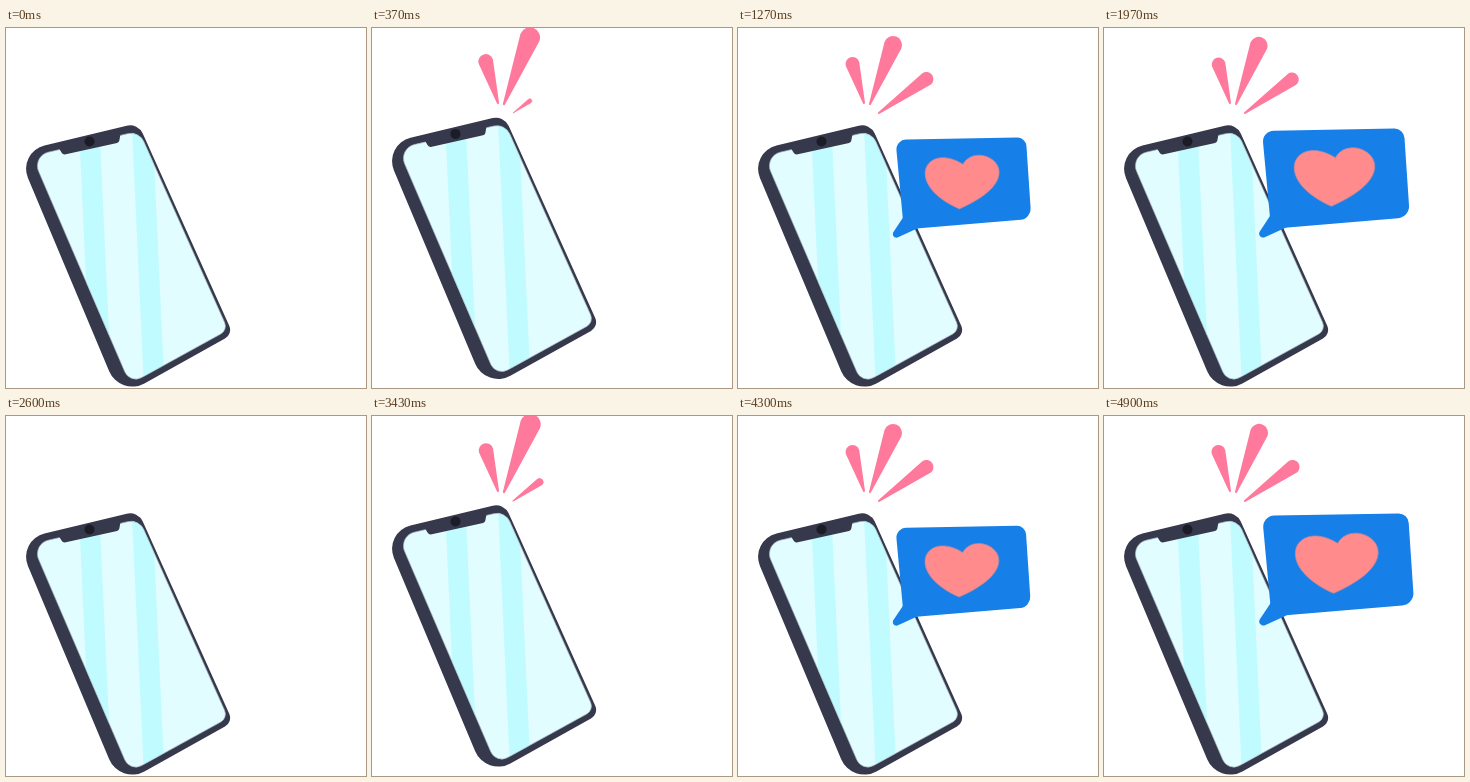
Animation, 360 px wide and 360 px high, one loop 5 s. Source, as an HTML page with a canvas:

```html
<!DOCTYPE html>
<html lang="en">
<head>
<meta charset="utf-8">
<title>Phone message</title>
<style>
  html, body { margin: 0; width: 100%; height: 100%; overflow: hidden; background: #fff; }
  canvas { display: block; width: 100vw; height: 100vh; }
</style>
</head>
<body>
<canvas id="stage"></canvas>
<script>
const SIZE = 360, LOOP = 5000, STEP = 200 / 3;
const REST = 2800, SECOND_POP = 3050;
const canvas = document.getElementById('stage');
const ctx = canvas.getContext('2d');

const COLORS = {
  body: '#36384b', screen: '#e1fdff', shine: '#c0fbff', rim: '#aab8c4',
  camera: '#1b1c26', bubble: '#177fe8', heart: '#ff8b8c', heartRim: '#b58a9c', spark: '#ff799c'
};

// Each corner is [x, y, radius].
function roundedShape(...corners) {
  const path = new Path2D();
  const [lastX, lastY] = corners[corners.length - 1];
  path.moveTo((lastX + corners[0][0]) / 2, (lastY + corners[0][1]) / 2);
  corners.forEach(([x, y, radius], i) => {
    const [nextX, nextY] = corners[(i + 1) % corners.length];
    path.arcTo(x, y, nextX, nextY, radius);
  });
  path.closePath();
  return path;
}

// A drop growing from its tip towards the centre of its round end.
function drop(tipX, tipY, endX, endY, radius) {
  const angle = Math.atan2(endY - tipY, endX - tipX);
  const path = new Path2D();
  path.moveTo(tipX, tipY);
  path.arc(endX, endY, radius, angle - Math.PI / 2, angle + Math.PI / 2);
  path.closePath();
  return { x: tipX, y: tipY, path };
}

const body = roundedShape([11, 124, 24], [132, 95, 14], [227, 306, 10], [114, 369, 25]);
const screen = roundedShape([26, 128, 14], [133, 103, 14], [222, 302, 9], [124, 356, 12]);
const notch = roundedShape([51, 117, 1], [57, 127, 4], [113, 114.5, 3], [115, 103, 1]);
const shines = [73, 126].map(x =>
  roundedShape([x, 100, 0], [x + 20.5, 100, 0], [x + 32.5, 360, 0], [x + 12, 360, 0]));
const bubble = roundedShape(
  [158, 102, 11], [301, 99.5, 10], [307, 189, 12], [182, 199.5, 12], [148, 215, 4], [166, 188, 3]);
const heart = new Path2D(
  'M228 178 C165 150 192 104 232 129 C248 100 315 140 228 178 Z');
const sparks = [
  drop(126, 75, 114.5, 36, 6),
  drop(132, 76, 155, 17, 8),
  drop(141, 85, 188.5, 51, 6)
];

const rise = (t, tau) => t > 0 ? 1 - Math.exp(-t / tau) : 0;
const spring = t => t > 0 ? 1 - Math.exp(-t / 90) * Math.cos(Math.PI * t / 190) : 0;
const bump = (t, center, width) => Math.exp(-(((t - center) / width) ** 2));

const hop = t => -8 * bump(t, 385, 80);
const sparkScale = (t, i) => spring(t - 138 - 100 * i) * spring(2357 - t);
const bubbleTurn = t => .035 * bump(t, 720, 150);

function bubbleScale(t) {
  const u = t - 870;
  const wobble = .22 * Math.exp(-u / 480) * Math.cos(Math.PI * u / 440);
  return rise(t - 385, 80) * rise(2230 - t, 55) * (1 + wobble);
}

function fill(path, color) {
  ctx.fillStyle = color;
  ctx.fill(path);
}

function outline(path, color, width) {
  ctx.strokeStyle = color;
  ctx.lineWidth = width;
  ctx.stroke(path);
}

function scaledAbout(x, y, scale, angle, draw) {
  if (scale < .01) return;
  ctx.save();
  ctx.translate(x, y);
  ctx.rotate(angle);
  ctx.scale(scale, scale);
  ctx.translate(-x, -y);
  draw();
  ctx.restore();
}

function drawPhone(lift) {
  ctx.save();
  ctx.translate(0, lift);
  fill(body, COLORS.body);
  fill(screen, COLORS.screen);
  ctx.save();
  ctx.clip(screen);
  shines.forEach(shine => fill(shine, COLORS.shine));
  ctx.restore();
  outline(screen, COLORS.rim, .7);
  fill(notch, COLORS.body);
  ctx.fillStyle = COLORS.camera;
  ctx.beginPath();
  ctx.arc(83.5, 113.5, 5, 0, 2 * Math.PI);
  ctx.fill();
  ctx.restore();
}

function drawScene(t) {
  ctx.fillStyle = '#fff';
  ctx.fillRect(0, 0, SIZE, SIZE);
  ctx.lineJoin = 'round';
  drawPhone(hop(t));
  sparks.forEach(({ x, y, path }, i) => {
    scaledAbout(x, y, sparkScale(t, i), 0, () => {
      fill(path, COLORS.spark);
      outline(path, COLORS.spark, 2);
    });
  });
  scaledAbout(152, 211, bubbleScale(t), bubbleTurn(t), () => {
    fill(bubble, COLORS.bubble);
    fill(heart, COLORS.heart);
    outline(heart, COLORS.heartRim, .8);
  });
}

function resize() {
  const ratio = devicePixelRatio || 1;
  canvas.width = Math.round(innerWidth * ratio);
  canvas.height = Math.round(innerHeight * ratio);
  ctx.setTransform(canvas.width / SIZE, 0, 0, canvas.height / SIZE, 0, 0);
}

const start = performance.now();

function tick() {
  const time = (performance.now() - start) % LOOP;
  // Poses are held on a 15 fps grid; the slack absorbs rounded clock times.
  const held = Math.max(0, (Math.floor((time + 6) / STEP - .5) + .5) * STEP);
  drawScene(held < REST ? held : held - SECOND_POP);
  requestAnimationFrame(tick);
}

addEventListener('resize', resize);
resize();
tick();
</script>
</body>
</html>
```
